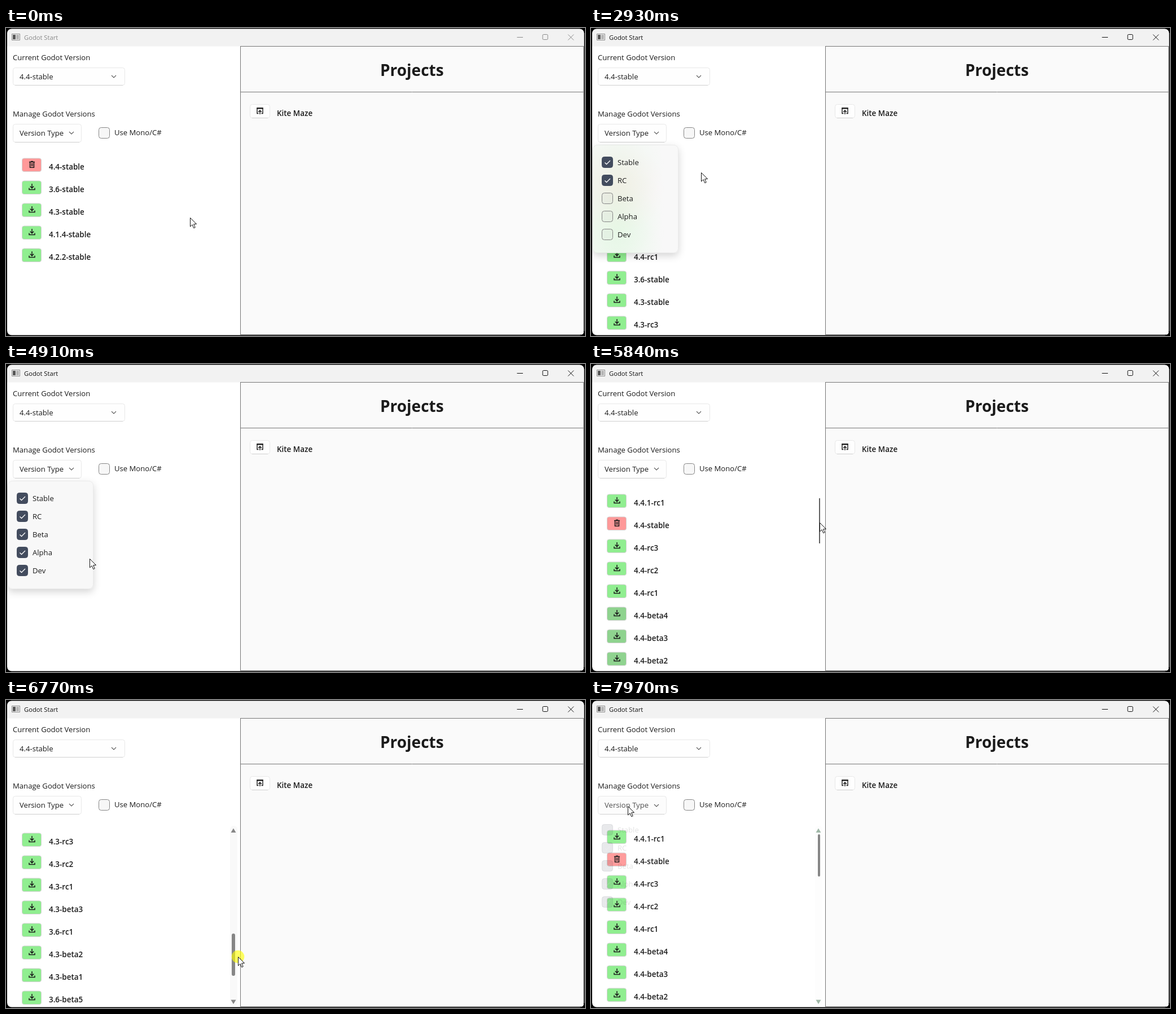
Animation of 1026 by 546 pixels, one loop 8000 ms. Source, as an HTML page with a canvas:

```html
<!DOCTYPE html>
<html lang="en">
<head>
<meta charset="utf-8">
<title>Godot Start</title>
<style>
  html, body { margin: 0; width: 100%; height: 100%; overflow: hidden; background: #000; }
  canvas { display: block; }
</style>
</head>
<body>
<canvas id="stage" width="1026" height="546"></canvas>
<script>
const ctx = document.getElementById('stage').getContext('2d');
const LOOP = 8000, STEP = 132.8, LEAD = 8;
const FONT = '"Open Sans", "Noto Sans", sans-serif';
const INK = '#1b1b1b', GREEN = '#90ee90', DULL = '#8fd38f', RED = '#ff9999';

const series = (name, from, to) =>
  Array.from({ length: from - to + 1 }, (_, i) => name + (from - i));
const stableList = ['4.4', '3.6', '4.3', '4.1.4', '4.2.2'].map(v => v + '-stable');
const head = ['4.4.1-rc1', '4.4-stable', ...series('4.4-rc', 3, 1)];
const rcList = [...head, '3.6-stable', '4.3-stable', '4.3-rc3'];
const fullList = [
  ...head, ...series('4.4-beta', 4, 1), ...series('4.4-dev', 7, 3), '3.7-dev1', '4.4-dev2',
  '3.6-stable', '4.4-dev1', '4.3-stable', ...series('4.3-rc', 3, 1), '4.3-beta3', '3.6-rc1',
  '4.3-beta2', '4.3-beta1', '3.6-beta5', ...series('4.3-dev', 6, 1)
];

// Cursor path: [tick, x, y]
const path = [
  [0, 326, 336], [1, 280, 305], [2, 224, 264], [3, 180, 236], [5, 119, 204], [7, 102, 191],
  [10, 102, 191], [13, 83, 226], [17, 66, 272], [20, 66, 272], [21, 122, 262], [22, 195, 256],
  [23, 199, 253], [25, 112, 290], [26, 74, 303], [28, 74, 303], [31, 72, 331], [33, 72, 331],
  [35, 68, 364], [36, 72, 362], [37, 148, 345], [38, 205, 332], [40, 266, 326], [42, 345, 305],
  [44, 405, 281], [46, 411, 279], [48, 411, 340], [51, 411, 455], [52, 411, 435], [54, 400, 310],
  [55, 380, 255], [58, 65, 188], [60, 65, 188]
];
const types = [['Stable', 0], ['RC', 20], ['Beta', 27], ['Alpha', 34], ['Dev', 36]];
const clicks = [7, 19, 26, 33, 35, 38, 59];
const emptyTicks = [21, 28, 35, 37];

const dragging = k => k >= 46 && k <= 54;

function cursorAt(k) {
  const i = Math.max(1, path.findIndex(p => p[0] >= k));
  const [k0, x0, y0] = path[i - 1], [k1, x1, y1] = path[i];
  const u = (k - k0) / (k1 - k0);
  return { x: Math.round(x0 + (x1 - x0) * u), y: Math.round(y0 + (y1 - y0) * u) };
}

function listAt(k) {
  if (emptyTicks.includes(k)) return [];
  return k < 21 ? stableList : k < 28 ? rcList : fullList;
}

function popupAt(k) {
  if (k < 8) return null;
  if (k < 39) return { alpha: [0.12, 0.8][k - 8] || 1, dy: [-8, -4, -1][k - 8] || 0 };
  if (k === 39) return { alpha: 0.45, dy: 0 };
  return k >= 60 ? { alpha: 0.12, dy: -8 } : null;
}

function text(str, x, y, size = 13.1, weight = 400, color = INK) {
  ctx.font = `${weight} ${size}px ${FONT}`;
  ctx.fillStyle = color;
  ctx.fillText(str, x, y);
}

function box(x, y, w, h, r, fill, stroke) {
  ctx.beginPath();
  ctx.roundRect(x, y, w, h, r);
  if (fill) { ctx.fillStyle = fill; ctx.fill(); }
  if (stroke) { ctx.strokeStyle = stroke; ctx.lineWidth = 1; ctx.stroke(); }
}

function lines(color, width, ...polylines) {
  ctx.beginPath();
  for (const pts of polylines)
    for (let i = 0; i < pts.length; i += 2)
      i ? ctx.lineTo(pts[i], pts[i + 1]) : ctx.moveTo(pts[i], pts[i + 1]);
  ctx.strokeStyle = color;
  ctx.lineWidth = width;
  ctx.stroke();
}

function polygon(color, ...pts) {
  ctx.beginPath();
  for (let i = 0; i < pts.length; i += 2) ctx.lineTo(pts[i], pts[i + 1]);
  ctx.closePath();
  ctx.fillStyle = color;
  ctx.fill();
}

function button(x, y, w, h, fill = '#fefefe') {
  box(x + .5, y + .5, w - 1, h - 1, 4, fill, '#e8e8e8');
  lines('#cfcfcf', 1, [x + 4, y + h - .5, x + w - 4, y + h - .5]);
}

const chevron = (x, y, color = '#5c5c5c') =>
  lines(color, 1.1, [x - 4, y - 2, x, y + 2, x + 4, y - 2]);

function checkbox(x, y, checked, fill) {
  box(x + .5, y + .5, 19, 19, 4, checked ? '#434c5e' : fill, checked ? '#434c5e' : '#868686');
  if (checked) lines('#fff', 1.3, [x + 5.5, y + 10.5, x + 8.5, y + 13.5, x + 15, y + 7]);
}

function drawTitleBar(active) {
  box(2, 1.5, 1022, 31, [8, 8, 0, 0], '#f2f2f2');
  box(10.5, 10.5, 14, 11, 0, '#f4f4f4', '#8c8c8c');
  ctx.fillStyle = '#555';
  ctx.fillRect(12, 12, 5, 8);
  ctx.fillStyle = '#b5b5b5';
  ctx.fillRect(18, 12, 5, 8);
  const color = active ? '#111' : '#8a8a8a';
  text('Godot Start', 32, 21, 11.2, 400, color);
  lines(color, 1, [905.5, 16.5, 916, 16.5]);
  box(951, 11.5, 9, 9, 1.5, null, color);
  lines(color, 1, [996, 11.5, 1006, 21.5], [1006, 11.5, 996, 21.5]);
}

function drawProjects() {
  ctx.fillStyle = '#fafafa';
  ctx.fillRect(415, 32, 609, 512);
  ctx.strokeStyle = '#767676';
  ctx.lineWidth = 1;
  ctx.strokeRect(415.5, 32.5, 608, 511);
  lines('#767676', 1, [415, 113.5, 1024, 113.5]);
  text('Projects', 663, 85, 28, 700);
  button(432, 135, 36, 25);
  lines(INK, 1.4, [447.5, 151.5, 445, 151.5, 445, 142, 455, 142, 455, 151.5, 452.5, 151.5],
    [450, 153, 450, 146.5], [447, 149, 450, 146, 453, 149]);
  lines(INK, 2.4, [444.4, 142.4, 455.6, 142.4]);
  text('Kite Maze', 480, 155.5, 13.45, 600);
}

function drawControls(k, cur) {
  text('Current Godot Version', 12, 57);
  button(12, 70, 199, 32);
  text('4.4-stable', 24, 91);
  chevron(191, 86);
  text('Manage Godot Versions', 12, 156.5);
  const hover = cur.x >= 12 && cur.x < 134 && cur.y >= 171 && cur.y < 203;
  button(12, 170, 122, 33, hover ? '#fcfcfc' : '#fefefe');
  text('Version Type', 24, 191, 13.1, 400, k >= 59 ? '#505050' : INK);
  chevron(116, k >= 59 ? 187 : 186);
  checkbox(164, 176, false, '#f7f7f7');
  text('Use Mono/C#', 192, 190);
}

function drawRow(name, y, dull) {
  const installed = name === '4.4-stable';
  box(28.5, y - 11, 34, 23.5, 3.5, installed ? RED : dull ? DULL : GREEN, '#d3d3d3');
  if (installed) {
    lines(INK, 1.5, [41, y - 4.5, 51, y - 4.5], [44, y - 5.6, 48, y - 5.6],
      [42.5, y - 4, 42.5, y + 5.2, 49.5, y + 5.2, 49.5, y - 4]);
    lines(INK, 1.2, [45, y - 2.5, 45, y + 3], [47.2, y - 2.5, 47.2, y + 3]);
  } else {
    lines(INK, 1.5, [46, y - 6, 46, y + 1.5], [42.8, y - 1.5, 46, y + 1.8, 49.2, y - 1.5],
      [41, y + 1.5, 41, y + 4.5, 51, y + 4.5, 51, y + 1.5]);
  }
  text(name, 76, y + 9, 13.45, 600);
}

function drawList(k, list, scroll) {
  ctx.save();
  ctx.beginPath();
  ctx.rect(2, 222, 413, 322);
  ctx.clip();
  const dull = k >= 38 && k < 45;
  list.forEach((name, i) => {
    const y = 242 + 40 * i - scroll;
    if (y > 200 && y < 570) drawRow(name, y, dull && i > 4);
  });
  ctx.restore();
}

function drawScrollBar(k, scroll) {
  if (k < 40) return;
  if (k < 45) {
    ctx.fillStyle = '#5f5f5f';
    ctx.fillRect(404, 238, 2, 80);
    return;
  }
  const closing = k >= 59, w = closing ? 4 : 6;
  box(397, 223, 13, 320, 6, closing ? '#fdfdfd' : '#f9f9f9');
  const arrow = closing ? '#a0b8a8' : '#868686';
  polygon(arrow, 398.5, 235, 403, 227.5, 407.5, 235);
  polygon(arrow, 398.5, 531.5, 403, 539, 407.5, 531.5);
  box(406 - w, 238 + scroll * 176 / 755, w, 75, w / 2, '#868686');
}

function drawPopup(k, { alpha, dy }, list, cur) {
  ctx.save();
  ctx.globalAlpha = alpha;
  ctx.translate(0, dy);
  ctx.save();
  if (alpha > .3) {
    ctx.shadowColor = 'rgba(0,0,0,.17)';
    ctx.shadowBlur = 14;
    ctx.shadowOffsetY = 5;
  }
  box(3, 207, 152, 192, 8, alpha > .3 ? '#f8f8f8' : 'rgba(250,250,250,.25)');
  ctx.restore();
  if (alpha > .3) {
    ctx.save();
    box(3, 207, 152, 192, 8);
    ctx.clip();
    list.slice(0, 5).forEach((name, i) => {
      const y = 242 + 40 * i, glow = ctx.createRadialGradient(46, y, 0, 46, y, 85);
      const rgb = name === '4.4-stable' ? '255,150,120' : '150,245,150';
      glow.addColorStop(0, `rgba(${rgb},.09)`);
      glow.addColorStop(1, `rgba(${rgb},0)`);
      ctx.fillStyle = glow;
      ctx.fillRect(3, 207, 152, 192);
    });
    ctx.restore();
    box(3.5, 207.5, 151, 191, 8, null, 'rgba(0,0,0,.05)');
  }
  types.forEach(([name, checkedFrom], i) => {
    const y = 228 + 32 * i;
    const hover = cur.x > 18 && cur.x < 140 && cur.y >= y - 6 && cur.y < y + 26;
    checkbox(19, y, k >= checkedFrom, hover ? 'rgba(0,0,0,.07)' : 'rgba(0,0,0,.025)');
    text(name, 47, y + 14.5);
  });
  ctx.restore();
}

function drawCursor({ x, y }, pressed) {
  if (pressed) {
    ctx.beginPath();
    ctx.arc(x, y, 11.3, 0, 2 * Math.PI);
    ctx.fillStyle = 'rgba(255,255,0,.62)';
    ctx.fill();
  }
  ctx.save();
  ctx.translate(x + .5, y + .5);
  polygon('#fff', 0, 0, 0, 15.5, 3.6, 12.2, 6.2, 18.2, 8.7, 17.1, 6.1, 11.3, 11, 11);
  ctx.closePath();
  ctx.strokeStyle = '#111';
  ctx.lineWidth = 1;
  ctx.stroke();
  ctx.restore();
}

function draw(ms) {
  const k = Math.min(60, Math.floor((ms % LOOP + LEAD) / STEP));
  const cur = cursorAt(k), list = listAt(k), popup = popupAt(k);
  const scroll = dragging(k) ? Math.max(0, (cur.y - 279) * 755 / 176) : 0;

  ctx.fillStyle = '#000';
  ctx.fillRect(0, 0, 1026, 546);
  ctx.save();
  box(2, 1.5, 1022.5, 543, 8, '#fff');
  ctx.clip();
  drawTitleBar(k >= 7);
  drawProjects();
  drawControls(k, cur);
  drawList(k, list, scroll);
  drawScrollBar(k, scroll);
  if (popup) drawPopup(k, popup, list, cur);
  ctx.restore();
  drawCursor(cur, clicks.includes(k) || dragging(k));
}

const start = performance.now();
function tick() {
  draw(performance.now() - start);
  requestAnimationFrame(tick);
}
tick();
</script>
</body>
</html>
```
